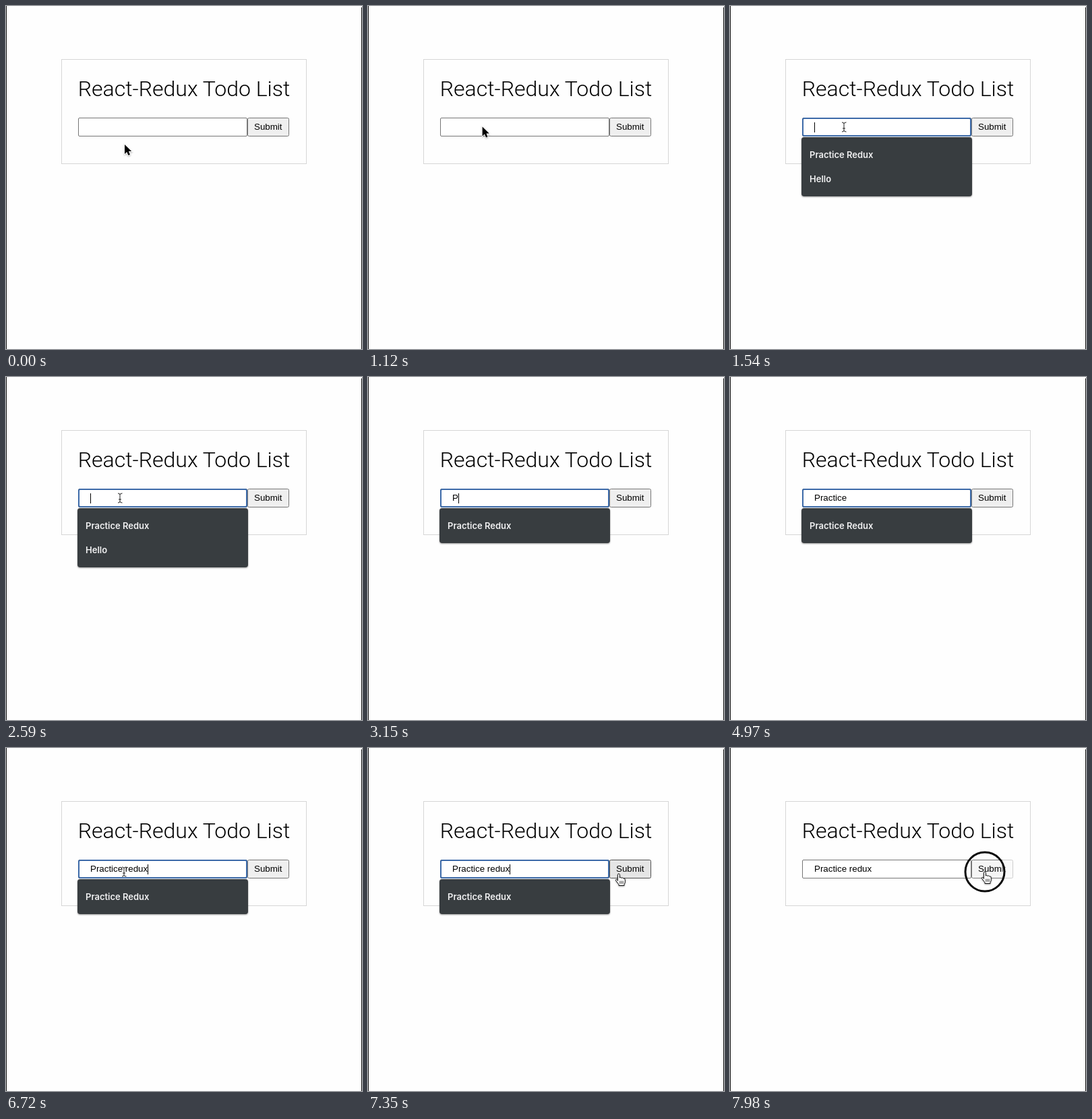
An HTML page for the animation above (8 s loop, 528x510 px).

```html
<!DOCTYPE html>
<html lang="en">
<head>
<meta charset="utf-8">
<title>Todo list</title>
<style>
  html, body { margin: 0; width: 100%; height: 100%; overflow: hidden; background: #fefefe; }
  svg { display: block; width: 528px; height: 510px; }
  text { white-space: pre; }
  .title { font: 300 32px Roboto, sans-serif; }
  .form { font: 13.333px "Liberation Sans", Arial, sans-serif; }
  .menu { font: 600 13px Inter, sans-serif; fill: #f1f1f2; }
</style>
</head>
<body>
<svg viewBox="0 0 528 510">
  <defs>
    <filter id="menuShadow" x="-10%" y="-10%" width="120%" height="130%">
      <feDropShadow dx="0" dy="1" stdDeviation="1" flood-opacity=".4"/>
    </filter>
    <filter id="pointerShadow" x="-50%" y="-50%" width="200%" height="200%">
      <feDropShadow dx="0" dy="1" stdDeviation=".8" flood-opacity=".35"/>
    </filter>
  </defs>

  <path d="M.5 0V510M527.5 2V510" stroke="#111"/>
  <rect x="82.5" y="79.5" width="363" height="155" fill="none" stroke="#d6d6d6"/>
  <text class="title" x="264" y="134" text-anchor="middle">React-Redux Todo List</text>

  <rect x="107.5" y="166.5" width="250" height="27" rx="1.5" fill="#fff" stroke="#767676"/>
  <rect id="button" x="358.5" y="166.5" width="61" height="27" rx="2"/>
  <text class="form" x="368" y="184">Submit</text>
  <rect id="focus" x="108" y="167" width="249" height="26" rx="2" fill="none" stroke="#3c6aa8" stroke-width="2"/>
  <text id="typed" class="form" x="125" y="184"></text>
  <rect id="caret" y="173" width="1" height="15"/>

  <g id="menu">
    <rect id="panel" x="106" y="195" width="253" rx="4" fill="#393c3f" filter="url(#menuShadow)"/>
    <text class="menu" x="118" y="226">Practice Redux</text>
    <text id="second" class="menu" x="118" y="262">Hello</text>
  </g>

  <g id="ring">
    <rect x="404" y="166" width="17" height="28" fill="#fefefe" opacity=".65"/>
    <circle cx="378" cy="184" r="29" fill="none" stroke="#0b0b0b" stroke-width="3"/>
  </g>

  <g id="arrow" filter="url(#pointerShadow)">
    <path d="M0 0V14L3.2 11 5.4 16 8 14.9 5.9 10.1H10.2Z" stroke="#fff" stroke-width="1.6" paint-order="stroke"/>
  </g>
  <path id="beam" d="M-3 -7Q0 -7 0 -5Q0 -7 3.5 -7M0 -5V5M-3 7Q0 7 0 5Q0 7 3.5 7M-2 2H2"
        transform="translate(169 180)" fill="none" stroke="#222"/>
  <g id="hand" filter="url(#pointerShadow)" stroke="#111" stroke-linejoin="round" stroke-linecap="round">
    <path fill="#fff" d="M-1.6 10V1.5Q-1.6 0 -.2 0Q1.3 0 1.3 1.5V6Q2.5 4.6 4 6.3Q5.5 5.1 6.8 6.9Q9.3 6.2 9.3 9
      V12Q9.3 14 8 15.5V17.5H0V15.8L-4 10.8Q-5.3 8.8 -3.8 8.2Q-2.7 8 -1.6 10Z"/>
    <path d="M1.8 11V14.5M4 11V14.5M6.2 11V14.5" stroke-width=".8"/>
  </g>
</svg>
<script>
const LOOP = 8000, TICK = 70;
const part = id => document.getElementById(id);
const { button, focus, typed, caret, menu, panel, second, ring, arrow, beam, hand } =
  Object.fromEntries([...document.querySelectorAll('[id]')].map(e => [e.id, e]));

const CLICK_IN = 1540, CLICK_OUT = 7910, HOVER = 7210, MOVE = 6720;
const phrase = 'Practice redux';
const keyTimes = [3080, 3290, 3430, 3570, 3850, 4060, 4200, 4270, 4410, 5110, 5250, 5530, 5740, 6300];
const blinks = [[2030, 2590], [4970, 5110], [6790, 7280]];

// Pointer stops: time, x, y
const path = [
  [0, 176, 206], [70, 175.5, 204], [210, 173, 194], [350, 170, 183], [490, 169, 179],
  [MOVE, 175, 184], [6860, 206, 193], [7000, 268, 198], [7140, 336, 196],
  [7210, 358, 193], [7350, 372, 187], [7490, 377, 185], [7560, 378, 184]
];

function pointAt(t) {
  const i = path.findIndex(p => p[0] > t);
  if (i < 0) return path.at(-1).slice(1);
  const [a, b] = [path[i - 1], path[i]];
  const k = (t - a[0]) / (b[0] - a[0]);
  return [a[1] + (b[1] - a[1]) * k, a[2] + (b[2] - a[2]) * k];
}

const show = (el, on) => el.style.display = on ? '' : 'none';

function draw(t) {
  const focused = t >= CLICK_IN && t < CLICK_OUT;
  const typing = t >= keyTimes[0];
  const hover = t >= HOVER, clicked = t >= CLICK_OUT;

  typed.textContent = phrase.slice(0, keyTimes.filter(k => k <= t).length);
  const width = typed.textContent ? typed.getComputedTextLength() : 0;
  caret.setAttribute('x', Math.round(125 + width));
  show(caret, focused && !blinks.some(([off, on]) => t >= off && t < on));
  show(focus, focused);
  show(menu, focused);
  show(second, !typing);
  panel.setAttribute('height', typing ? 52 : 88);

  button.setAttribute('fill', clicked ? '#f5f5f5' : hover ? '#e5e5e5' : '#efefef');
  button.setAttribute('stroke', hover && !clicked ? '#4f4f4f' : '#767676');
  show(ring, clicked);

  const [x, y] = pointAt(t);
  const moving = t >= MOVE && !hover;
  const overInput = moving && y < 194;
  for (const el of [arrow, hand]) el.setAttribute('transform', `translate(${x} ${y})`);
  beam.setAttribute('transform', overInput ? `translate(${x} ${y})` : 'translate(169 180)');
  show(arrow, t < CLICK_IN || (moving && !overInput));
  show(beam, (focused && !typing) || overInput);
  show(hand, hover);
}

const start = performance.now();
function loop() {
  const t = (performance.now() - start) % LOOP;
  draw(Math.floor(t / TICK) * TICK);
  requestAnimationFrame(loop);
}
loop();
</script>
</body>
</html>
```
